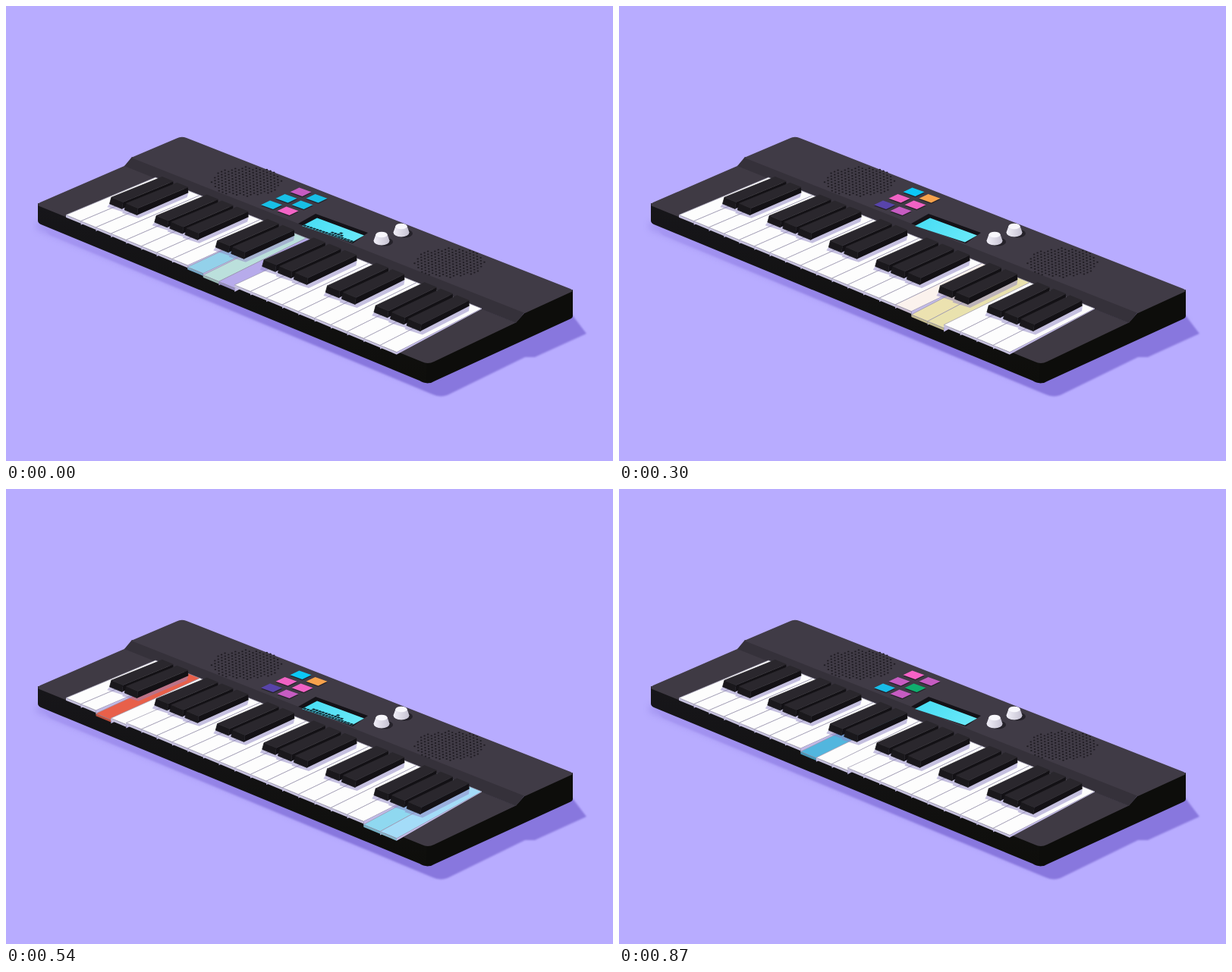
An HTML page for the animation above (900 ms loop, 800x600 px).

```html
<!DOCTYPE html>
<html lang="en">
<head>
<meta charset="utf-8">
<title>Keyboard</title>
<style>
html, body { margin: 0; width: 100%; height: 100%; overflow: hidden; background: #b8acff; }
svg { display: block; width: 800px; height: 600px; }
</style>
</head>
<body>
<svg id="stage" viewBox="0 0 800 600">
  <defs>
    <linearGradient id="cast" gradientUnits="userSpaceOnUse" x1="42" y1="0" x2="420" y2="0">
      <stop offset="0" stop-color="#a798f4"/>
      <stop offset="1" stop-color="#8877de"/>
    </linearGradient>
    <linearGradient id="front" x1="0" y1="0" x2="0" y2="1">
      <stop offset="0" stop-color="#17161a"/>
      <stop offset="1" stop-color="#0e0e0b"/>
    </linearGradient>
    <linearGradient id="knob" x1="0" y1="0" x2="1" y2="0">
      <stop offset="0" stop-color="#f1eff8"/>
      <stop offset="1" stop-color="#c6c2d2"/>
    </linearGradient>
    <linearGradient id="glass" x1="0" y1="0" x2="1" y2="0.4">
      <stop offset="0" stop-color="#45dcf4"/>
      <stop offset="1" stop-color="#66e8f8"/>
    </linearGradient>
    <filter id="soft"><feGaussianBlur stdDeviation="5"/></filter>
    <filter id="haze"><feGaussianBlur stdDeviation="0.8"/></filter>
  </defs>
  <rect width="800" height="600" fill="#b8acff"/>
  <path d="M40 284L557 498L748 412V424L562 508L40 294Z" fill="#7a69d2" opacity=".35" filter="url(#soft)"/>
  <path d="M43 286L58 302L562 512Q572 517 582 513L684 463L697 463L765 432L745 406L557 480Z" fill="url(#cast)" filter="url(#haze)"/>

  <path d="M42 260L557 470V497Q552 498 545 494L46 288Q42 286 42 283Z" fill="url(#front)"/>
  <path d="M555 470L672 417L684 404L747 374V409Q747 411 744 412.500L565 494.500Q560 498 554 497Z" fill="#0d0d0b"/>
  <path d="M45 259L157 210.500L672 417.500L564 469Q556 473 548 469L44 264Q40 262 45 259Z" fill="#3f3a44"/>
  <path d="M156 211L166 199L684 404L672 418Z" fill="#35313a"/>
  <path d="M165 200L225 174.500Q231 171.500 238 174L744 373Q749 375.500 744 377.500L684 405Z" fill="#403b46"/>
  <g id="holes" fill="#1f1c23"/>

  <path d="M385 287L408 274L477 299L457 313Z" fill="#141217"/>
  <path d="M390 290L410 279.500L472 302.500L456 311.500Z" fill="url(#glass)"/>
  <path id="bars" fill="#12303a"/>
  <g id="pads"/>
  <g id="knobs"/>
  <g id="white" stroke-linejoin="round"/>
  <g id="shade" fill="#8f84c4" opacity=".5"/>
  <g id="black"/>
</svg>
<script>
const LOOP = 900, COUNT = 21;
const $ = id => document.getElementById(id);
const clamp = x => Math.max(0, Math.min(1, x));
const mix = (a, b, f) => a + (b - a) * f;

function add(parent, tag, attrs) {
  const el = document.createElementNS('http://www.w3.org/2000/svg', tag);
  for (const k in attrs) el.setAttribute(k, attrs[k]);
  $(parent).appendChild(el);
  return el;
}
const poly = pts => 'M' + pts.map(p => p.map(n => n.toFixed(2)).join(' ')).join('L') + 'Z';

// Perspective map of the key bed: k counts white keys, v runs front to back, z lifts.
const A = [79, 275.5], B = [515, 456.5], C = [627, 399], D = [197, 226];
const d1 = [B[0] - C[0], B[1] - C[1]], d2 = [D[0] - C[0], D[1] - C[1]];
const sum = [0, 1].map(i => A[i] - B[i] + C[i] - D[i]);
const den = d1[0] * d2[1] - d2[0] * d1[1];
const g = (sum[0] * d2[1] - d2[0] * sum[1]) / den;
const h = (d1[0] * sum[1] - sum[0] * d1[1]) / den;
function at(k, v, z = 0) {
  const u = k / COUNT, w = 1 + g * u + h * v;
  const [x, y] = [0, 1].map(i =>
    (A[i] + (B[i] * (1 + g) - A[i]) * u + (D[i] * (1 + h) - A[i]) * v) / w);
  return [x, y - z];
}

// Speaker grilles
for (const [cx, cy] of [[317, 231.5], [584.5, 338.5]])
  for (let i = -7; i <= 7; i++)
    for (let j = -7; j <= 7; j++)
      if (i * i + j * j < 52)
        add('holes', 'ellipse', { cx: cx + i * 4.7 + j * 4.5, cy: cy + i * 1.85 - j * 2, rx: 1.3, ry: 0.95 });

// Pads
const padSpots = [[388.5, 245], [369.5, 253.5], [350, 262], [409.5, 253.5], [390.5, 262], [371.5, 270]];
const padSets = [
  ['#c65cc2', '#18bfe6', '#18bfe6', '#18bfe6', '#18bfe6', '#f364c6'],
  ['#0cc8f6', '#f062c4', '#5844aa', '#f8a24c', '#f062c4', '#c65cc2'],
  ['#f562c6', '#c65cc2', '#18bde8', '#c65cc2', '#10ae6e', '#c65cc2']
];
const rhomb = (x, y) => poly([[x - 14, y + .2], [x - 2, y - 5.6], [x + 14, y + .2], [x + 2, y + 6]]);
const pads = padSpots.map(([x, y]) => {
  add('pads', 'path', { d: rhomb(x, y + 1.3), fill: '#221f26' });
  return add('pads', 'path', { d: rhomb(x, y) });
});

// Knobs
for (const [x, y] of [[521, 291], [495, 302]]) {
  add('knobs', 'ellipse', { cx: x + 4, cy: y + 9, rx: 11, ry: 5.5, fill: '#25222a' });
  add('knobs', 'path', {
    d: `M${x - 7.5} ${y - 1}L${x - 10.5} ${y + 7.5}A10.500 6 0 0 0 ${x + 10.5} ${y + 7.5}L${x + 7.5} ${y - 1}Z`,
    fill: 'url(#knob)'
  });
  add('knobs', 'ellipse', { cx: x, cy: y - .5, rx: 7.6, ry: 3.8, fill: '#f8f7fc' });
}

// White keys: flash colour and time of the press
const notes = [
  ['ee6cc0', 396], ['f0708a', 466], ['e8604a', 537], ['f0945c', 592], ['ece3b0', 645], ['eae4b4', 660], ['cfe3b0', 735],
  ['8fd4c4', 800], ['52b6de', 868], ['bbe0dc', 901], ['b4a8ea', 906], ['f4eefa', 980], ['f469c4', 1020], ['f0708a', 1085],
  ['f0b08c', 1140], ['ece2b0', 1194], ['e9e2ae', 1200], ['92cfca', 1312], ['8edbe8', 1321], ['8fd8f0', 1434], ['a4dcf8', 1442]
];
const rgb = hex => [0, 2, 4].map(i => parseInt(hex.substr(i, 2), 16));
const css = c => `rgb(${c.map(Math.round)})`;
const keys = notes.map(([hex, peak], k) => ({
  k, peak, tint: rgb(hex), stay: k === COUNT - 1 ? 95 : 8,
  front: add('white', 'path', {}),
  top: add('white', 'path', { stroke: '#9a95ad', 'stroke-width': .7 }),
  side: add('white', 'path', { fill: '#c2bae6' })
}));

function drawKey(key, t) {
  const { k } = key;
  const dt = ((t - key.peak + 400) % LOOP + LOOP) % LOOP - 400;
  const down = dt < 0 ? clamp((dt + 80) / 55) : 1 - clamp((dt - key.stay) / 48);
  const glow = dt < 0 ? clamp((dt + 30) / 25) : 1 - clamp((dt - 10) / 58);
  const dip = 4.2 * down;
  const a = at(k, 0, -dip), b = at(k + 1, 0, -dip), c = at(k + 1, 1), d = at(k, 1);
  const drop = (p, n) => [p[0], p[1] + n];
  const color = key.tint.map(n => mix(253, n, glow));
  const dark = [198, 193, 222].map((n, i) => mix(n, key.tint[i] * .82, glow));
  key.front.setAttribute('d', poly([a, b, drop(b, 3.2), drop(a, 3.2)]));
  key.front.setAttribute('fill', css(dark));
  key.top.setAttribute('d', poly([a, b, c, d]));
  key.top.setAttribute('fill', css(color));
  key.side.setAttribute('d', poly([b, c, drop(c, .4), drop(b, k < COUNT - 1 ? 5 : 3)]));
}

// Black keys
for (let k = 1; k < COUNT; k++) {
  if (k % 7 === 0 || k % 7 === 3) continue;
  const fl = at(k - .42, .385), fr = at(k + .42, .385), br = at(k + .4, .97);
  const tl = at(k - .39, .4, 8), tr = at(k + .39, .4, 8), bl = at(k - .37, .97, 7), tb = at(k + .37, .97, 7);
  add('shade', 'path', {
    d: poly([fl, at(k - .25, .33), at(k + .72, .35), at(k + .72, .9), br])
  });
  add('black', 'path', { d: poly([fr, br, tb, tr]), fill: '#131115' });
  add('black', 'path', { d: poly([fl, fr, tr, tl]), fill: '#1a181c', stroke: '#1a181c', 'stroke-width': .8, 'stroke-linejoin': 'round' });
  add('black', 'path', { d: poly([tl, tr, tb, bl]), fill: '#2a272d', stroke: '#2a272d', 'stroke-width': .8, 'stroke-linejoin': 'round' });
}

// Level meter: column heights at a few moments
const levels = [
  [0, '1111111122321111'], [120, '2332221111000000'], [300, '0000000000000000'], [420, '0121321100011210'],
  [540, '1122222223221111'], [660, '0000112332210000'], [870, '0000000000000000'], [900, '1111111122321111']
];
function drawBars(t) {
  const n = levels.findIndex(l => l[0] > t);
  const [t0, from] = levels[n - 1], [t1, to] = levels[n];
  const f = (t - t0) / (t1 - t0);
  let d = '';
  for (let c = 0; c < 16; c++) {
    const rows = Math.round(mix(+from[c], +to[c], f));
    for (let r = 0; r < rows; r++) {
      const x = 391 + c * 4.1 + r * 3.4, y = 289.8 + c * 1.36 - r * 1.8;
      d += poly([[x, y], [x + 2.6, y - 1.5], [x + 5.8, y - .3], [x + 3.3, y + 1.2]]);
    }
  }
  $('bars').setAttribute('d', d);
}

function draw(t) {
  const set = padSets[Math.floor(t / 300)];
  pads.forEach((p, i) => p.setAttribute('fill', set[i]));
  keys.forEach(key => drawKey(key, t));
  drawBars(t);
}

const start = performance.now();
function tick() {
  const t = (performance.now() - start) % LOOP;
  draw(Math.floor(t / 30) * 30);
  requestAnimationFrame(tick);
}
tick();
</script>
</body>
</html>
```
